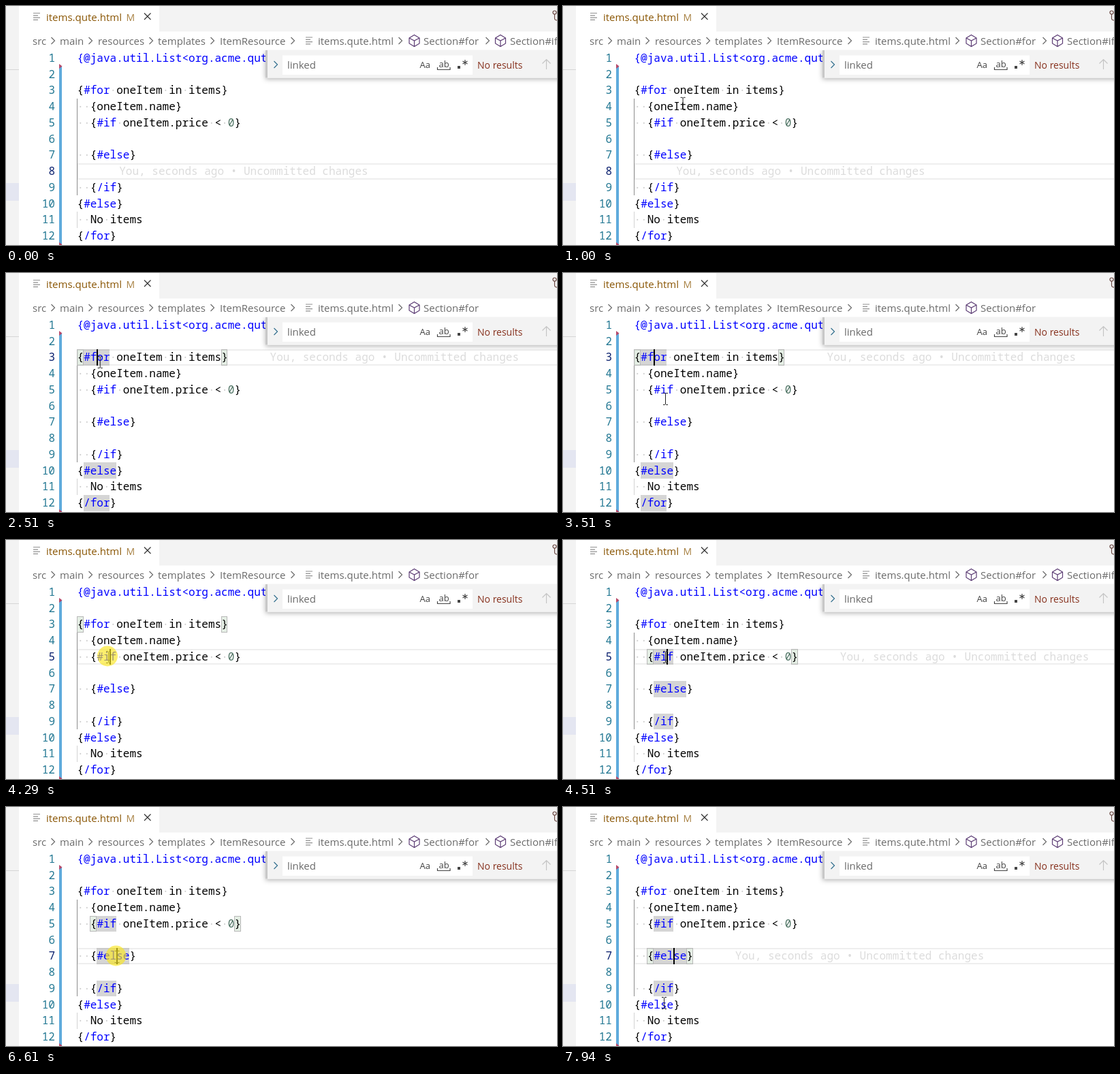
These frames come from a looping animation (809x351 px, 8 s). An HTML page:

```html
<!DOCTYPE html>
<html lang="en">
<head>
<meta charset="utf-8">
<style>
html, body { margin: 0; width: 100%; height: 100%; overflow: hidden; background: #fff; }
svg { display: block; }
text { white-space: pre; font: 15px "Open Sans", sans-serif; fill: #6a6a6a; }
.code, .code text { font: 16.04px "Noto Sans Mono", monospace; fill: #000; }
.code rect { shape-rendering: crispEdges; }
.code .key { fill: #00f; }
.code .num { fill: #4a7060; }
.code .dot { fill: #cfcfcf; }
.code .note { fill: #dcdcdc; }
.code .lineNo { fill: #237893; text-anchor: end; }
.code .lineNo.active { fill: #0b216f; }
.mark { fill: #575757; fill-opacity: .25; }
.match { fill: #006400; fill-opacity: .1; stroke: #b9b9b9; }
.icon { fill: none; stroke: #6a6a6a; stroke-width: 1.2; }
</style>
</head>
<body>
<svg id="stage" width="809" height="351" viewBox="0 0 809 351"></svg>
<script>
const LOOP = 8000, CHAR = 9.624, LINE = 23.75, LEFT = 104;
const NOTE = "You, seconds ago • Uncommitted changes";
const code = [
  "{@java.util.List<org.acme.qut", "", "{#for oneItem in items}", "  {oneItem.name}",
  "  {#if oneItem.price < 0}", "", "  {#else}", "", "  {/if}", "{#else}", "  No items", "{/for}"
];
const colX = col => LEFT + col * CHAR;
const lineY = line => 64.5 + (line - 1) * LINE;
const baseY = line => lineY(line) + 17.3;

const label = (x, y, s, attrs = "") => `<text x="${x}" y="${y}" ${attrs}>${s}</text>`;
const rect = (x, y, w, h, attrs) => `<rect x="${x}" y="${y}" width="${w}" height="${h}" ${attrs}/>`;
const icon = (d, attrs = "") => `<path class="icon" d="${d}" ${attrs}/>`;
const group = (id, body) => `<g id="${id}">${body}</g>`;
const escapeText = s => s.replace(/</g, "&lt;");

const chevron = (x, y = 51, attrs = "") => icon(`M${x - 2.5} ${y - 5}l5 5l-5 5`, attrs);
const fileIcon = (x, y) => icon(`M${x} ${y}h10m-10 3.3h7m-7 3.3h10m-10 3.3h7`, 'style="stroke:#909090"');
const cube = x => icon(`M${x} 47l7.5 -4.5l7.5 4.5v8l-7.5 4.5l-7.5 -4.5zl7.5 4l7.5 -4m-7.5 4v8.5`, 'style="stroke:#5c3c74"');

function highlight(line, i) {
  if (i === 0) return `<tspan class="key">${escapeText(line)}</tspan>`;
  return line.replace(/[#/]\w+| +|\d+|</g, s => {
    if (s === "<") return "&lt;";
    if (s[0] === " ") return `<tspan class="dot">${"·".repeat(s.length)}</tspan>`;
    return `<tspan class="${/\d/.test(s) ? "num" : "key"}">${s}</tspan>`;
  });
}

// Each span is [line, first column, length].
const marks = spans => spans.map(([line, col, n]) =>
  rect(colX(col), lineY(line), n * CHAR, LINE, 'class="mark"')).join("");

function brackets(line) {
  const text = code[line - 1];
  return [text.indexOf("{"), text.length - 1].map(col =>
    rect(colX(col) + .5, lineY(line) + .5, CHAR - 1, LINE - 1, 'class="match"')).join("");
}

const note = line => label(colX(code[line - 1].length) + 62.2, baseY(line), NOTE, 'class="note"');

const frame =
  rect(0, 0, 19, 351, 'fill="#f3f3f3"') +
  rect(0, 260, 19, 26, 'fill="#e4e6f1"') +
  rect(0, 93, 19, 1, 'fill="#d6d6d6"') +
  rect(225, 0, 584, 37.5, 'fill="#f3f3f3"') +
  fileIcon(40, 10.5) +
  label(59, 21.5, "items.qute.html", 'style="fill:#895503"') +
  label(176.5, 21.5, "M", 'style="fill:#895503;fill-opacity:.75;font-size:14px"') +
  icon("M203 10.5l9.5 9.5m0 -9.5l-9.5 9.5", 'style="stroke:#333"') +
  icon("M808 9.5a2.5 2.5 0 1 0 -5 0a2.5 2.5 0 1 0 5 0M805.5 12v6q0 3 4 3", 'style="stroke:#6b4a44"');

const crumbs =
  [[39, "src"], [79, "main"], [135, "resources"], [223, "templates"], [314, "ItemResource"],
   [458, "items.qute.html"], [613, "Section#for"]].map(([x, s]) => label(x, 56.5, s)).join("") +
  [69, 124, 213, 303, 421, 579].map(x => chevron(x)).join("") +
  fileIcon(440, 46) + cube(592) +
  group("innerCrumb", chevron(707) + cube(718.5) + label(740, 56.5, "Section#if"));

const gutter =
  rect(78, 88, 3.5, 263, 'fill="#5fabdc"') +
  '<path d="M78 85l4.5 3.5l-4.5 3.5zM78 347l4.5 3.5l-4.5 3.5z" fill="#b84a6a"/>';

const guides =
  rect(104, 136, 1, 142, 'fill="#8c8c8c"') +
  rect(104, 302, 1, LINE, 'fill="#d3d3d3"');

const finder =
  rect(381, 64, 440, 41.5, 'fill="#f3f3f3" filter="url(#shadow)"') +
  rect(381, 65, 3, 40.5, 'fill="#c8c8c8"') +
  rect(406, 72.5, 279, 28.5, 'fill="#fff"') +
  chevron(396, 86, 'style="stroke:#33708f"') +
  label(413, 92, "linked") +
  label(607.5, 91, "Aa", 'style="font-size:13px;fill:#444"') +
  label(635.5, 90, "ab", 'style="font-size:13px;fill:#444"') +
  icon("M633.5 90v3.5h18.5v-3.5", 'style="stroke:#444"') +
  rect(663, 88, 4, 4, 'fill="#444"') +
  icon("M674 79v8m-3.5 -6l7 4m0 -4l-7 4", 'style="stroke:#444"') +
  label(692, 91.5, "No results", 'style="font-size:14px;fill:#86301c"') +
  icon("M793.5 93v-14.5m-6 6l6 -6l6 6", 'style="stroke:#c4c4c4"');

const byLine = (name, lines, draw) => lines.map(n => group(name + n, draw(n))).join("");

document.getElementById("stage").innerHTML =
  `<defs><filter id="shadow" x="-5%" y="-30%" width="110%" height="160%">
    <feDropShadow dx="0" dy="2" stdDeviation="3.5" flood-color="#000" flood-opacity=".3"/></filter>
    <clipPath id="editor"><rect y="64.5" width="809" height="287"/></clipPath></defs>` +
  frame + crumbs +
  `<g class="code" clip-path="url(#editor)">` +
  `<rect id="current" x="105" width="720" height="21.75" fill="none" stroke="#eee" stroke-width="2"/>` +
  guides + gutter +
  group("forMarks", marks([[3, 1, 4], [10, 1, 5], [12, 1, 4]])) +
  group("ifMarks", marks([[5, 3, 3], [7, 3, 5], [9, 3, 3]])) +
  byLine("match", [3, 5, 7], brackets) +
  code.map((s, i) => label(72, baseY(i + 1), i + 1, `class="lineNo" id="no${i + 1}"`) +
    label(LEFT + .5, baseY(i + 1), highlight(s, i))).join("") +
  byLine("note", [3, 5, 7, 8], note) +
  rect(0, 0, 2, LINE, 'id="caret"') +
  `</g><g clip-path="url(#editor)">${finder}</g>` +
  icon("M-3.5 -8.5h2.3l1.2 1l1.2 -1h2.3M0 -7.5v15M-3.5 8.5h2.3l1.2 -1l1.2 1h2.3", 'id="mouse" style="stroke:#222;stroke-width:1"') +
  `<circle id="click" cx="-1.5" cy="-1.5" r="15" fill="#fae620" fill-opacity=".65"/>`;

const $ = id => document.getElementById(id);
const show = (id, on) => { $(id).style.display = on ? "" : "none"; };

// Latest value whose start time has passed: [[start, value], ...].
const at = (steps, t) => steps.filter(s => s[0] <= t).pop()[1];

const currentLine = [[0, 8], [1500, 3], [4290, 5], [6610, 7]];
const matchLine = [[0, 0], [1560, 3], [4360, 5], [6680, 7]];
const noteLine = [[0, 8], [1500, 0], [1750, 3], [4290, 0], [4450, 5], [6610, 0], [6860, 7]];
const markKind = [[0, ""], [1820, "for"], [4290, ""], [4510, "if"]];
const clicks = [[1500, 1650], [4290, 4360], [6610, 6680]];
const caretCol = { 3: 3, 5: 5, 7: 6, 8: 0 };
const caretToggles = [1500, 2050, 2510, 3010, 3510, 3980, 4290, 4740, 5290, 5770, 6270, 7080, 7600];
const mousePath = [
  [150, 452, 263], [300, 325.5, 188], [410, 325.5, 186], [1240, 138.5, 132], [1340, 138, 130],
  [2440, 138, 130], [3290, 150.5, 183], [3350, 150.5, 185], [3600, 150.5, 185],
  [3980, 150.5, 172], [5850, 150.5, 172], [6460, 163, 220], [7330, 163, 220],
  [7580, 185, 240], [7940, 148.5, 288], [8000, 148.5, 288]
];

function mouseAt(t) {
  const next = mousePath.findIndex(p => p[0] > t);
  const [t0, x0, y0] = mousePath[next - 1], [t1, x1, y1] = mousePath[next];
  const u = (t - t0) / (t1 - t0), k = u * u * (3 - 2 * u);
  return [x0 + (x1 - x0) * k, y0 + (y1 - y0) * k];
}

function render(t) {
  const line = at(currentLine, t), marked = at(markKind, t);
  $("current").setAttribute("y", lineY(line) + 1);
  code.forEach((_, i) => $("no" + (i + 1)).classList.toggle("active", i + 1 === line));
  [3, 5, 7].forEach(n => show("match" + n, at(matchLine, t) === n));
  [3, 5, 7, 8].forEach(n => show("note" + n, at(noteLine, t) === n));
  show("forMarks", marked === "for");
  show("ifMarks", marked === "if");
  show("innerCrumb", t < 1880 || t >= 4510);

  show("caret", caretToggles.filter(c => c <= t).length % 2);
  $("caret").setAttribute("transform", `translate(${colX(caretCol[line])} ${lineY(line)})`);

  const visible = t >= 150;
  show("mouse", visible);
  show("click", clicks.some(([from, to]) => t >= from && t < to));
  if (visible) {
    const move = `translate(${mouseAt(t).join(" ")})`;
    $("mouse").setAttribute("transform", move);
    $("click").setAttribute("transform", move);
  }
}

function tick() {
  render(performance.now() % LOOP);
  requestAnimationFrame(tick);
}
tick();
</script>
</body>
</html>
```
